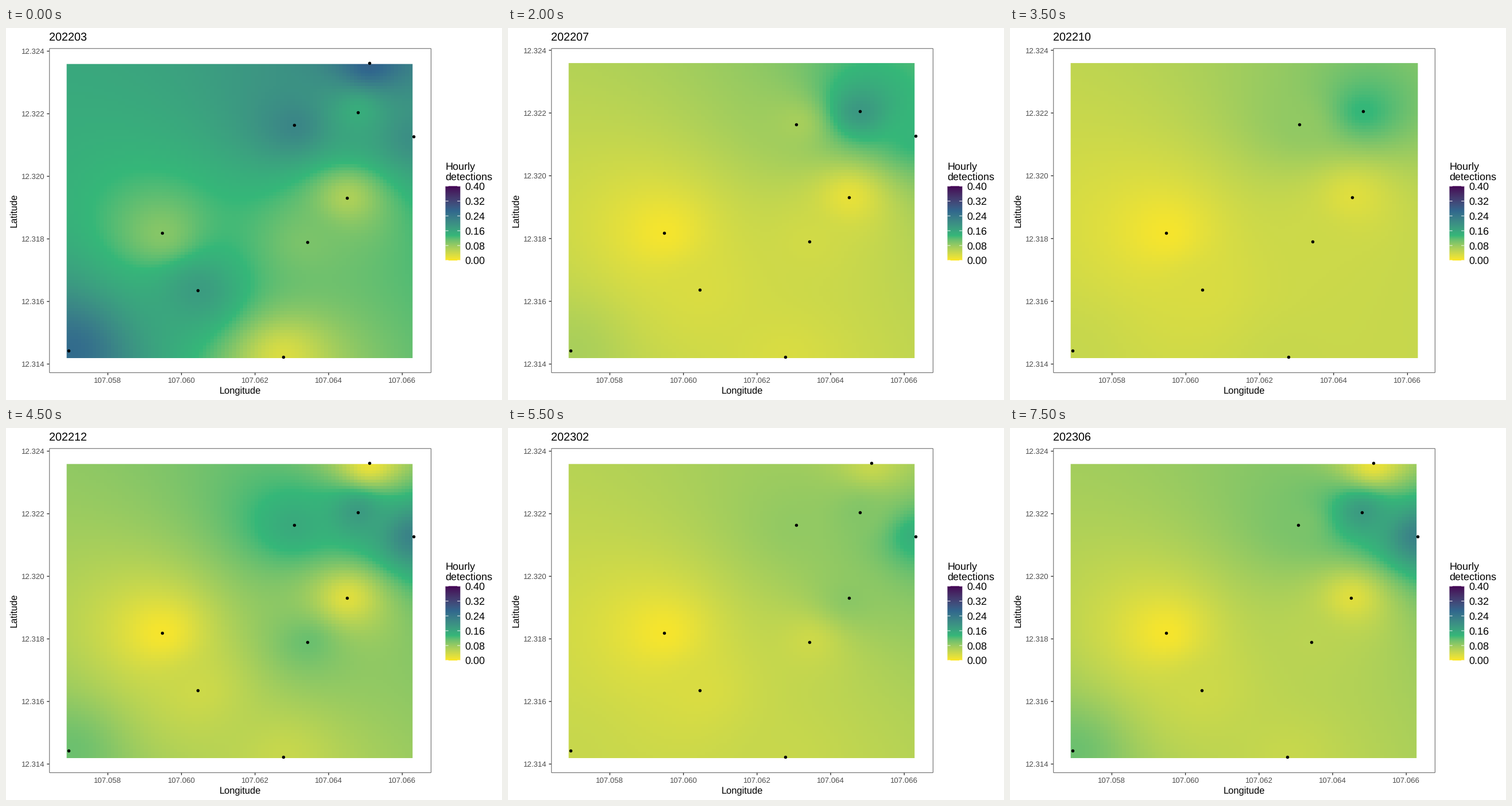
A matplotlib script for the animation above (8 s loop, 864 by 648 pixels).

```python
import numpy as np
import matplotlib.pyplot as plt
from matplotlib.animation import FuncAnimation
from matplotlib.patches import Rectangle

plt.rcParams["font.family"] = "Liberation Sans"
plt.rcParams["text.hinting"] = "none"

W, H, DPI = 864, 648, 72
LEFT, RIGHT, TOP, BOTTOM = 75.4, 740.7, 35.4, 600.7   # panel
X_TICK0, X_STEP = 177.4, 128.25                       # 107.058, per 0.002 deg
Y_TICK0, Y_STEP = 585.4, 109.0                        # 12.314, per 0.002 deg
CELLS = 94
CELL_W, CELL_H = X_STEP / 20, Y_STEP / 20
GX0, GY1 = 105.6, 575.0
GX1, GY0 = GX0 + CELLS * CELL_W, GY1 - CELLS * CELL_H
BOX = 100, 716, 56, 581                               # whole pixels around the field
BAR = 765.45, 791.35, 275.4, 405.0

# name: x, y, first rate, settled rate, half-yearly swing
STATIONS = {
    "A": (108.7, 562, .26, .066, .043),
    "B": (271.7, 357.2, .093, .006, 0),
    "C": (334.2, 456.7, .178, .033, .007),
    "D": (483.5, 572.6, .03, .045, 0),
    "E": (525.5, 373, .10, .045, .01),
    "F": (594.6, 296.2, .065, .025, 0),
    "G": (502.2, 169.2, .215, .09, .01),
    "H": (613.3, 146.6, .15, .15, .03),
    "I": (633.3, 61.1, .275, .035, -.02),
    "J": (710.6, 189, .20, .171, .05),
}
NAMES = list(STATIONS)
X, Y, FIRST, SETTLED, SWING = np.array(list(STATIONS.values())).T

# Short bursts and dips: station, month, change
BURSTS = [("A", 2, -.11), ("C", 2, .106), ("H", 2, -.10),
          ("H", 5, .14), ("E", 9, .055), ("G", 9, .055),
          ("F", 11, .065), ("H", 11, -.04), ("D", 13, .07)]
OFFLINE = {3: "I", 4: "I", 5: "G", 6: "G", 7: "IJ", 8: "IJ"}
MONTHS = 16


def pulse(month, peak):
    return max(0, 1 - abs(month - peak) / 2)


def station_rates(month):
    """Rates settle from their first level, swing twice a year, dip in the rains."""
    wave = SWING * np.cos(2 * np.pi * (month - 9) / 6)
    start = (FIRST - SETTLED + SWING) * np.exp(-month / 1.3)
    rates = (SETTLED + wave + start) * (1 - .62 * pulse(month, 5))
    for name, peak, change in BURSTS:
        rates[NAMES.index(name)] += change * pulse(month, peak)
    return np.maximum(rates, 0)


# --- colour ramp: four viridis stops mixed in CIE Lab ---
TO_XYZ = np.array([[.4125, .3576, .1804], [.2127, .7152, .0722], [.0193, .1192, .9503]])
WHITE = TO_XYZ.sum(axis=1)
TO_LAB = np.array([[0, 116, 0], [500, -500, 0], [0, 200, -200]])


def rgb_to_lab(rgb):
    lin = np.where(rgb > .04045, ((rgb + .055) / 1.055) ** 2.4, rgb / 12.92)
    t = lin @ TO_XYZ.T / WHITE
    f = np.where(t > .008856, np.cbrt(t), 7.787 * t + 16 / 116)
    return f @ TO_LAB.T


def lab_to_rgb(lab):
    f = lab @ np.linalg.inv(TO_LAB).T
    t = np.where(f > .2069, f ** 3, (f - 16 / 116) / 7.787)
    lin = np.clip((t * WHITE) @ np.linalg.inv(TO_XYZ).T, 0, 1)
    rgb = np.where(lin > .0031308, 1.055 * lin ** (1 / 2.4) - .055, 12.92 * lin)
    return np.clip(rgb, 0, 1)


STOPS = rgb_to_lab(plt.get_cmap("viridis")(np.linspace(1, 0, 4))[:, :3])
POS = np.linspace(0, 3, 1201)
RAMP = lab_to_rgb(np.stack([np.interp(POS, range(4), c) for c in STOPS.T], axis=1))


def colour(value):
    return RAMP[np.clip(np.rint(value / .4 * 1200), 0, 1200).astype(int)]


# --- inverse distance weights, in degrees ---
cells = np.arange(CELLS) + .5
gx, gy = np.meshgrid(GX0 + cells * CELL_W, GY0 + cells * CELL_H)
WEIGHTS = 1 / (((gx[..., None] - X) / X_STEP) ** 2
               + ((gy[..., None] - Y) / Y_STEP) ** 2 + 1e-9)


def online(month):
    return [i for i, name in enumerate(NAMES) if name not in OFFLINE.get(month, "")]


def heat(month):
    on = online(month)
    w = WEIGHTS[..., on]
    return colour(w @ station_rates(month)[on] / w.sum(axis=-1))


def cell_index(lo, hi, start, end):
    """Cell under each pixel from lo to hi when the grid spans start..end."""
    i = np.floor((np.arange(lo, hi) + .5 - start) / (end - start) * CELLS)
    return np.clip(i, 0, CELLS - 1).astype(int)


def rescale(v, lo, hi, start, end):
    """Fit lo..hi plus 5% padding on each side to the panel."""
    pad = .05 * (hi - lo)
    return start + (v - lo + pad) / (hi - lo + 2 * pad) * (end - start)


# --- static parts ---
fig = plt.figure(figsize=(W / DPI, H / DPI), dpi=DPI, facecolor="white")
ax = fig.add_axes([0, 0, 1, 1])


def label(x, y, s, size, color="black", ha="left", **kw):
    return ax.text(x, y, s, size=size, color=color, ha=ha, va="baseline", **kw)


def line(x0, y0, x1, y1, color="#333333", width=1.4):
    return ax.plot([x0, x1], [y0, y1], color=color, lw=width, snap=False,
                   solid_capstyle="butt", zorder=4)[0]


def frame(color, width, zorder):
    return ax.add_patch(Rectangle((0, 0), 1, 1, fill=False, ec=color, lw=width,
                                  snap=False, joinstyle="miter", zorder=zorder))


def place(patch, x0, x1, y0, y1, grow):
    patch.set_bounds(x0 - grow, y0 - grow, x1 - x0 + 2 * grow, y1 - y0 + 2 * grow)


def picture(data, x0, x1, y0, y1):
    return ax.imshow(data, extent=(x0, x1, y1, y0), aspect="auto",
                     interpolation="nearest", zorder=1)


field = picture(heat(0), *BOX)
field_edge = frame("white", 14, 2)

bar_rows = np.arange(273, 408) + .5
bar_values = np.clip((BAR[3] - bar_rows) / (BAR[3] - BAR[2]), 0, 1) * .4
picture(colour(bar_values)[:, None], 763, 794, 273, 408)
place(frame("white", 8, 2), *BAR, 4)

ax.set(xlim=(0, W), ylim=(H, 0))
ax.axis("off")

place(frame("#333333", .8, 3), LEFT, RIGHT, TOP, BOTTOM, -.4)
title = label(75, 22.7, "", 19.8)
label(407.8, 636.5, "Longitude", 16.5, ha="center")
label(18.6, 318, "Latitude", 16.5, ha="center", rotation=90, rotation_mode="anchor")
label(765.3, 245.8, "Hourly", 18)
label(765.3, 265.3, "detections", 18)
for k in range(6):
    y = BAR[3] - .2 - k * 25.84
    label(799.6, y + 6.4, f"{k * .08:.2f}", 18)
    for x in (BAR[0], BAR[1] - 5.2):
        line(x, y, x + 5.2, y, "white", .9)

x_ticks = [(X_TICK0 + k * X_STEP, line(0, BOTTOM, 0, BOTTOM + 4.1),
            label(0, 617.7, f"{107.058 + k * .002:.3f}", 13.2, "#4D4D4D", "center"))
           for k in range(5)]
y_ticks = [(Y_TICK0 - k * Y_STEP, line(LEFT - 4.1, 0, LEFT, 0),
            label(68, 0, f"{12.314 + k * .002:.3f}", 13.2, "#4D4D4D", "right"))
           for k in range(6)]
dots = ax.plot([], [], "o", ms=5.5, color="black", mew=0, snap=False, zorder=5)[0]


def draw(month):
    on = online(month)
    x_lim = GX0, max(GX1, X[on].max())
    y_lim = min(GY0, Y[on].min()), GY1

    def sx(v):
        return rescale(v, *x_lim, LEFT, RIGHT)

    def sy(v):
        return rescale(v, *y_lim, TOP, BOTTOM)

    title.set_text(f"{2022 + (month + 2) // 12}{(month + 2) % 12 + 1:02d}")
    x0, x1, y0, y1 = sx(GX0), sx(GX1), sy(GY0), sy(GY1)
    cols, rows = cell_index(*BOX[:2], x0, x1), cell_index(*BOX[2:], y0, y1)
    field.set_data(heat(month)[np.ix_(rows, cols)])
    place(field_edge, x0, x1, y0, y1, 7)
    dots.set_data(sx(X[on]), sy(Y[on]))
    for v, tick, text in x_ticks:
        tick.set_xdata([sx(v)] * 2)
        text.set_x(sx(v))
    for v, tick, text in y_ticks:
        tick.set_ydata([sy(v)] * 2)
        text.set_y(sy(v) + 4.7)
    return field, dots, title


anim = FuncAnimation(fig, draw, frames=MONTHS, interval=500, repeat=True, blit=False)
plt.show()
```
